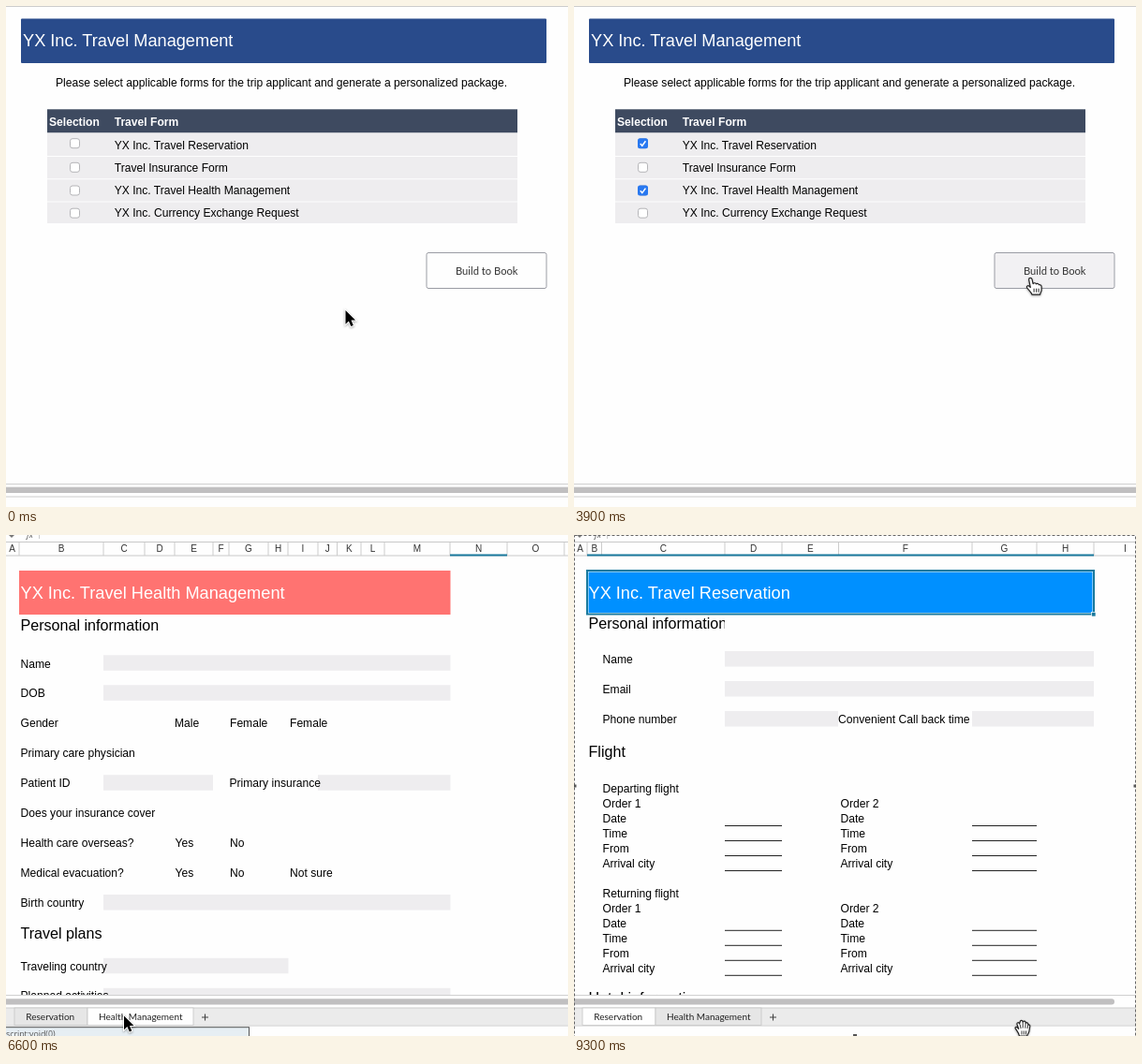
An HTML page that plays this animation: 600x535 px, repeating every 9400 ms.

```html
<!DOCTYPE html>
<html lang="en">
<head>
<meta charset="utf-8">
<style>
  html, body { margin: 0; width: 100%; height: 100%; overflow: hidden; background: #fefefe; }
  svg { display: block; width: 600px; height: 535px; font: 12.1px "Liberation Sans", Arial, sans-serif; }
  text { white-space: pre; }
  .title { font-size: 18.2px; fill: #fff; }
  .section { font-size: 16.1px; }
  .head { font-weight: bold; fill: #fff; }
  .column { font-size: 10px; text-anchor: middle; fill: #333; }
  .tab { font: 10px Lato, sans-serif; fill: #222; }
  .button { font: 11.2px Lato, sans-serif; fill: #333; }
  .tip { font: 8.8px "Open Sans", sans-serif; fill: #555; }
</style>
</head>
<body>
<svg id="stage" viewBox="0 0 600 535"></svg>
<script>
const LOOP = 9400;
const COMPANY = 'YX Inc.';
const TEAL = '#1a7a9e';
const FIELD = '#eeedef';

const rect = (x1, y1, x2, y2, fill, extra = '') =>
  `<rect x="${x1}" y="${y1}" width="${x2 - x1}" height="${y2 - y1}" fill="${fill}" ${extra}/>`;
const line = (x1, y1, x2, y2, color = '#ccc', width = 1) =>
  `<path d="M${x1} ${y1}L${x2} ${y2}" stroke="${color}" stroke-width="${width}"/>`;
const text = (x, y, label, style = '') => `<text x="${x}" y="${y}" class="${style}">${label}</text>`;
const group = (id, content, extra = '') => `<g id="${id}" ${extra}>${content}</g>`;
const field = (x1, y, x2) => rect(x1, y, x2, y + 16.5, FIELD);

// Column letters centred between the dividers
function columns(edges, selectedFrom, selectedTo) {
  const cells = edges.slice(1).map((edge, i) => {
    const middle = (edges[i] + Math.min(edge, 622)) / 2;
    return text(middle, 18, String.fromCharCode(65 + i), 'column') + line(edge, 8, edge, 22);
  });
  return rect(0, 0, 600, 22, '#fefefe') +
    text(22, 3, '<tspan font-style="italic">fx</tspan>', 'tip') +
    '<path d="M3 0H9L6 3Z" fill="#777"/>' + line(35.5, 0, 35.5, 4) +
    line(0, 7.5, 600, 7.5, '#c8c8c8') + line(0, 22, 600, 22, '#c8c8c8') +
    cells.join('') +
    (selectedTo ? line(selectedFrom, 21.5, selectedTo, 21.5, TEAL, 2) : '');
}

function checkbox(y, id) {
  const box = rect(68.5, y - 5, 78.5, y + 5, '#fff', 'rx="2.5" stroke="#b5b5b8"');
  if (!id) return box;
  return box + group(id,
    rect(68, y - 5.5, 79, y + 5.5, '#2878f0', 'rx="2.5"') +
    `<path d="M70.8 ${y + .3}l2 2.3 3.6-5" fill="none" stroke="#fff" stroke-width="1.5"/>`);
}

function selectionPage() {
  const forms = [COMPANY + ' Travel Reservation', 'Travel Insurance Form',
    COMPANY + ' Travel Health Management', COMPANY + ' Currency Exchange Request'];
  const tops = [135.5, 161, 185.3, 209.5, 233];
  const boxes = [146.7, 172.3, 197, 221.2];
  const rows = forms.map((form, i) =>
    rect(44, tops[i], 546, tops[i + 1] - 1, FIELD) +
    text(115.7, [152.5, 177.2, 201.4, 225][i], form) +
    checkbox(boxes[i], ['check1', '', 'check3', ''][i]));
  return rect(16, 13.5, 577, 61, '#294b8b', 'rx="1"') +
    text(18, 43.3, COMPANY + ' Travel Management', 'title') +
    text(53, 86, 'Please select applicable forms for the trip applicant and generate a personalized package.') +
    rect(44, 110.3, 546, 135.5, '#3e4a60') +
    text(46, 127.7, 'Selection', 'head') + text(115.7, 127.7, 'Travel Form', 'head') +
    rows.join('') +
    rect(449, 263.5, 577, 301.5, '#fefefe', 'id="button" rx="2" stroke="#9a9ca4"') +
    text(480, 286.6, 'Build to Book', 'button');
}

function flight(y, name) {
  const labels = ['Date', 'Time', 'From', 'Arrival city'];
  return text(30.5, y, name) + [30.5, 284.5].map((x, side) =>
    text(x, y + 16, 'Order ' + (side + 1)) +
    labels.map((label, i) => {
      const rowY = y + 32 + i * 16;
      const [from, to] = side ? [425, 494] : [161, 222];
      return text(x, rowY, label) + line(from, rowY + 3.3, to, rowY + 3.3, '#222');
    }).join('')).join('');
}

function reservationPage() {
  return columns([-1, 14, 29.5, 161, 222, 282.5, 425, 494, 555, 625], 14, 555) +
    rect(15.5, 39.5, 553.5, 83, '#0090ff') +
    rect(14, 38, 555, 84.5, 'none', `stroke="${TEAL}" stroke-width="2"`) +
    rect(552.5, 82.5, 557, 87, TEAL, 'stroke="#fff" stroke-width=".7"') +
    text(15.5, 67.8, COMPANY + ' Travel Reservation', 'title') +
    `<clipPath id="cell"><path d="M0 85H161V110H0Z"/></clipPath>` +
    `<g clip-path="url(#cell)">${text(15.5, 100, 'Personal information', 'section')}</g>` +
    field(161, 124, 555) + field(161, 156, 555) + field(161, 188, 282) + field(425, 188, 555) +
    text(30.5, 137, 'Name') + text(30.5, 168.7, 'Email') + text(30.5, 200.7, 'Phone number') +
    text(282, 200.7, 'Convenient Call back time') +
    text(15.5, 236.6, 'Flight', 'section') +
    flight(275.2, 'Departing flight') + flight(387, 'Returning flight') +
    text(15.5, 499.5, 'Hotel information', 'section');
}

function healthPage() {
  const labels = ['Name', 'DOB', 'Gender', 'Primary care physician', 'Patient ID',
    'Does your insurance cover', 'Health care overseas?', 'Medical evacuation?', 'Birth country'];
  return columns([-1, 14, 104, 148, 180, 221, 238, 280, 301, 333, 353.5, 379, 404, 474, 535, 596], 474, 535) +
    rect(14, 38, 474.5, 85, '#ff7371') +
    text(15.5, 67.8, COMPANY + ' Travel Health Management', 'title') +
    text(15.5, 102, 'Personal information', 'section') +
    [128.3, 160.3, 384].map(y => field(104, y, 474.5)).join('') +
    field(104, 256.2, 221) + field(333, 256.2, 474.5) +
    field(104, 451.8, 301.5) + field(104, 483.8, 474.5) +
    labels.map((label, i) => text(15.5, 141.5 + i * 31.95, label)).join('') +
    text(180, 205.4, 'Male') + text(239, 205.4, 'Female') + text(303, 205.4, 'Female') +
    text(238.5, 269.3, 'Primary insurance') +
    text(180.5, 333.2, 'Yes') + text(239, 333.2, 'No') +
    text(180.5, 365.1, 'Yes') + text(239, 365.1, 'No') + text(303, 365.1, 'Not sure') +
    text(15.5, 431, 'Travel plans', 'section') +
    text(15.5, 464.6, 'Traveling country') + text(15.5, 496.3, 'Planned activities');
}

function bottomBar(tabs, active, thumbEnd = 610) {
  const tabShapes = tabs.map(([label, from, to, x], i) =>
    rect(from, 505, to, 523.5, i === active ? '#fefefe' : '#e6e6e6', 'stroke="#c6c6c6" stroke-width=".8"') +
    text(x, 517.6, label, 'tab'));
  const plus = tabs[tabs.length - 1][2] + 12.5;
  return rect(0, 491, 600, 535, '#fefefe') + line(0, 491.5, 600, 491.5, '#d0d0d0') +
    rect(-10, 495.3, thumbEnd, 501.5, '#c0bfc0', 'rx="3"') +
    rect(0, 505, 600, 523.5, '#ebebeb') + line(0, 505, 600, 505) + line(0, 524, 600, 524) +
    tabShapes.join('') +
    `<path d="M${plus - 3.5} 515h7m-3.5-3.5v7" stroke="#444" stroke-width="1.1"/>`;
}

const bookTabs = [['Reservation', 9, 87, 21.3], ['Health Management', 87, 200, 99]];
const plainBar = rect(0, 510, 600, 535, '#fefefe') + line(0, 510.5, 600, 510.5, '#d0d0d0') +
  rect(0, 513.7, 600, 520, '#c0bfc0') + line(0, 524, 600, 524);

const outline = 'fill="#fff" stroke="#222" stroke-width="1.2" stroke-linejoin="round"';
const cursors = {
  arrow: '<path d="M0 0V14.8L3.4 11.6 5.8 17 8.3 15.9 6 10.6H10.6Z" stroke="#fff" stroke-width="2" paint-order="stroke"/>',
  cross: `<path d="M-2.3-7.2H2.3V-2.3H7.2V2.3H2.3V7.2H-2.3V2.3H-7.2V-2.3H-2.3Z" ${outline}/>`,
  pointer: `<path d="M-5.5-7C-5.5-9.5-2.5-9.5-2-7L-1-2.5C0-4 2-3.5 2.3-2.3 3.5-3.3 5-2.7 5.2-1.5 6.5-2 8-1 8 .5V4C8 6 6.5 7 6.5 9H-2C-3 6-6 4-7.5 1.5-8.3 0-6.5-1.2-5 .2L-3.8 1.3Z" ${outline}/>
    <path d="M0 2.5v4m2.6-4v4m2.4-4v4" stroke="#222"/>`,
  palm: `<path d="M-3.5 8.5C-4 5-7 2-8 0-8-1.6-6-1.6-4.3.8L-6-4C-6.5-6-4-6.5-3.4-4.5L-2.8-6.5C-2.5-8.6 0-8.6.2-6.3 1-8.2 3.2-7.5 3.2-5.5 4.6-6.6 6-5.2 5.8-3.5 7.2-4 8-3 7.7-1.5L6.8 4 4.5 8.5Z" ${outline}/>
    <path d="M-2.9-4l1 4.5M.2-6V0m3-5.5L2.8.2m3-3.7L5 .5M-1 3v4m2.3-4v4m2.2-4v4" stroke="#222" stroke-width=".9"/>`
};

const stage = document.getElementById('stage');
stage.innerHTML = rect(0, 0, 600, 535, '#fefefe') +
  group('selection', selectionPage()) +
  group('topLine', line(0, .5, 600, .5)) +
  group('sheetColumns', columns([-1, 16, 44, 114, 546, 577])) +
  group('reservation', reservationPage()) +
  group('health', healthPage()) +
  group('plainBar', plainBar) +
  group('sheetBar', bottomBar([['Sheet1', 9, 64, 21]], 0)) +
  group('reservationBar', bottomBar(bookTabs, 0, 577)) +
  group('healthBar', bottomBar(bookTabs, 1)) +
  group('tip', rect(-5, 525.7, 259.5, 545, '#e6eef3', 'stroke="#555"') + text(0, 536, 'script:void(0)', 'tip')) +
  group('frame', rect(.5, .5, 599.5, 540, 'none', 'stroke="#666" stroke-dasharray="3 2"') +
    rect(0, 266.5, 2.5, 269.5, '#555') + rect(597.5, 266.5, 600, 269.5, '#555') +
    rect(298, 533, 302, 536, '#555')) +
  Object.entries(cursors).map(([id, shape]) => group(id, shape,
    'style="filter:drop-shadow(0 1px 1px #0005)"')).join('');

const part = id => document.getElementById(id);
const show = (id, visible) => { part(id).style.display = visible ? '' : 'none'; };

// time, x, y, shape shown from this point on
const path = [
  [0, 362.5, 325, 'arrow'], [200, 350, 315, 'cross'], [1000, 88, 160, 'arrow'],
  [1300, 73, 146.5, 'arrow'], [1800, 73, 146.5, 'arrow'], [2000, 73, 169, 'arrow'],
  [2200, 73, 196.5, 'arrow'], [2600, 73, 196.5, 'cross'], [3000, 214, 250, 'cross'],
  [3600, 470, 284, 'pointer'], [4000, 495, 302, 'pointer'], [4400, 495.5, 305.5, 'pointer'],
  [4700, 495, 306, 'cross'], [5000, 390, 388, 'cross'], [5300, 252, 546, 'cross'],
  [5500, 64, 546, 'arrow'], [5600, 60, 534, 'arrow'], [6100, 120, 512, 'arrow'],
  [6500, 126, 513.5, 'arrow'], [7600, 126, 513.5, 'arrow'], [8000, 52, 511, 'arrow'],
  [8400, 54, 513, 'arrow'], [8600, 60, 546, 'arrow'], [8700, 440, 548, 'palm'],
  [9200, 479, 526.5, 'palm'], [LOOP, 479, 526.5, 'palm']
];

function moveCursor(t) {
  const i = path.findIndex((point, n) => n + 1 < path.length && t < path[n + 1][0]);
  const [t0, x0, y0, shape] = path[i];
  const [t1, x1, y1] = path[i + 1];
  const p = (t - t0) / (t1 - t0);
  const eased = p * p * (3 - 2 * p);
  Object.keys(cursors).forEach(id => show(id, id === shape));
  part(shape).setAttribute('transform',
    `translate(${x0 + (x1 - x0) * eased} ${y0 + (y1 - y0) * eased})`);
}

function draw(now) {
  const t = Math.floor(now % LOOP / 100) * 100;
  const shifted = t >= 4000, built = t >= 4700;
  const health = t >= 6600 && t < 8200;
  show('selection', !built);
  part('selection').setAttribute('transform', `translate(0 ${shifted ? 24.3 : 0})`);
  show('topLine', !shifted);
  show('sheetColumns', shifted && !built);
  show('reservation', built && !health);
  show('health', health);
  show('plainBar', t < 4100);
  show('sheetBar', t >= 4100 && !built);
  show('reservationBar', built && !health);
  show('healthBar', health);
  show('check1', t >= 1700);
  show('check3', t >= 2400);
  part('button').setAttribute('fill', t >= 3600 ? '#f2f1f3' : '#fefefe');
  show('tip', t >= 6000 && t < 8600);
  show('frame', t >= 9200);
  moveCursor(t);
}

const start = performance.now();
function tick() {
  draw(performance.now() - start);
  requestAnimationFrame(tick);
}
tick();
</script>
</body>
</html>
```
